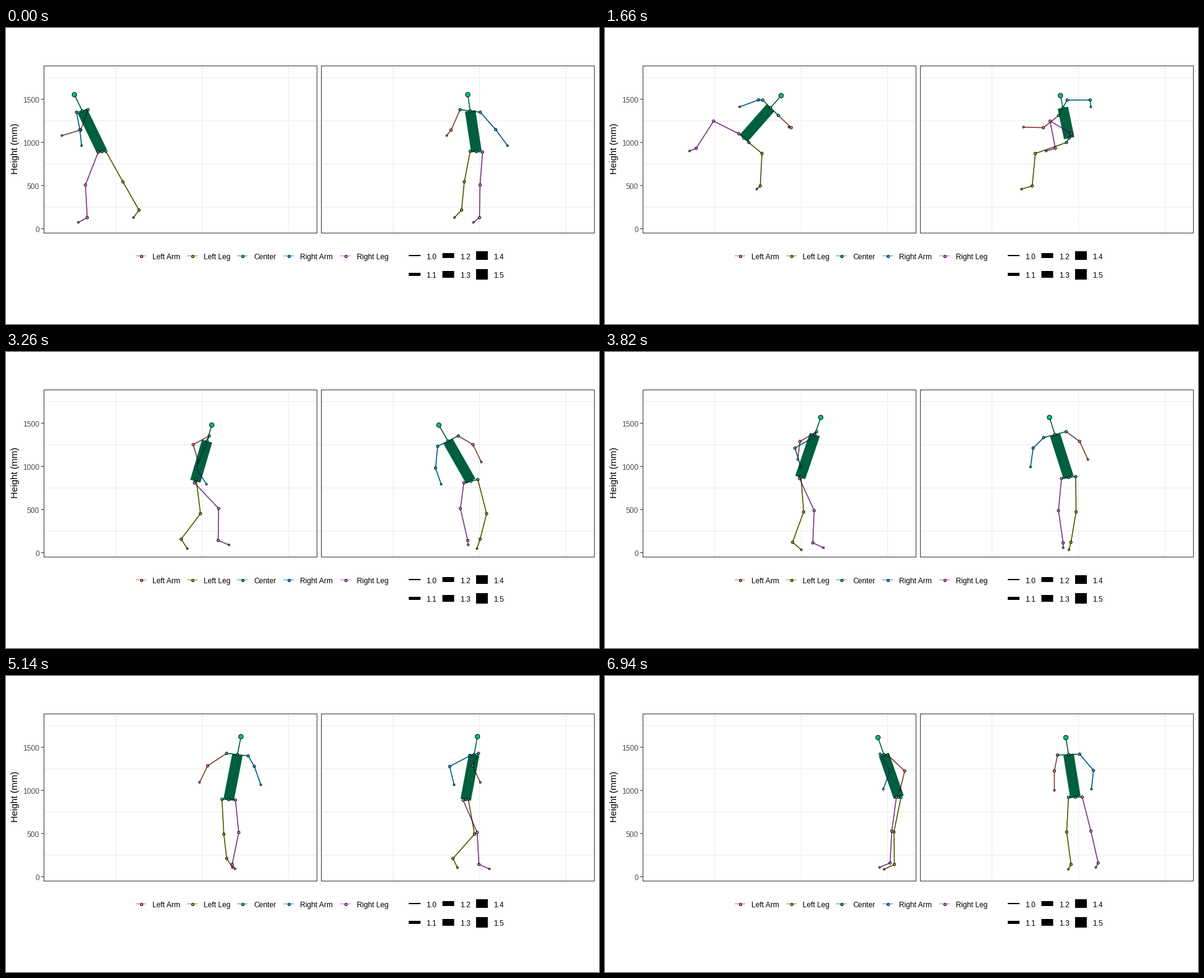
Animation of 960x480 px, one loop 6960 ms. Source, as a matplotlib script:

```python
import numpy as np
import matplotlib.pyplot as plt
from matplotlib.animation import FuncAnimation
from matplotlib.collections import LineCollection

W, H, DPI = 960, 480, 100
FRAMES, STEP = 348, 20
PX = 72 / DPI  # points per pixel

plt.rcParams["font.family"] = "Liberation Sans"
HUES = np.array([[248, 118, 109], [163, 165, 0], [0, 191, 125],
                 [0, 176, 246], [231, 107, 243]]) / 255
NAMES = ["Left Arm", "Left Leg", "Center", "Right Arm", "Right Leg"]

# Skeleton sizes in pixels
SHOULDER, HIP = 19, 11.7
UPPER_ARM, FOREARM = 38, 32.5
THIGH, SHANK, FOOT = 57.5, 53, 19
GROUND = 309

# Key moments: (side x, front x, screen y) of the driving points
KEYS = np.array([0, 920, 2360, 3260, 4380, 5900, 6940.0])
YAW = np.radians([-147, -114, -95, -3, -4, 167, 198])
PELVIS = np.array([(155, 761, 200), (170, 757, 202), (278, 747, 156), (306, 752, 209),
                   (327, 747, 197), (404, 742, 203), (475, 761, 196.0)])
NECK = [(123, 751, 134), (162, 726, 135), (229, 757, 197), (325, 715, 144),
        (350, 740, 124), (395, 756, 130), (451, 750, 127)]
L_HAND = [(90, 713, 174), (194, 656, 120), (212, 728, 129), (311, 769, 178),
          (318, 797, 169), (370, 699, 175), (477, 727, 185)]
R_HAND = [(122, 812, 191), (127, 802, 133), (305, 757, 184), (324, 704, 214),
          (311, 676, 158), (397, 779, 194), (450, 787, 183)]
L_ANKLE = [(215, 737, 295), (222, 736, 301), (219, 675, 117), (283, 767, 303),
           (326, 746, 304), (444, 737, 287), (468, 754, 305)]
R_ANKLE = [(131, 766, 307), (125, 762, 297), (327, 686, 157), (343, 747, 305),
           (338, 734, 306), (369, 733, 304), (461, 798, 303)]


def spline(t, v):
    """Cubic Hermite through the keys, flat at local extremes."""
    col = (-1,) + (1,) * (v.ndim - 1)
    slope = np.diff(v, axis=0) / np.diff(KEYS).reshape(col)
    m = np.gradient(v, KEYS, axis=0)
    m[1:-1][slope[1:] * slope[:-1] <= 0] = 0
    i = np.clip(np.searchsorted(KEYS, t, "right") - 1, 0, len(KEYS) - 2)
    h = (KEYS[i + 1] - KEYS[i]).reshape(col)
    s = (t - KEYS[i]).reshape(col) / h
    return ((1 + 2 * s) * (1 - s) ** 2 * v[i] + s * (1 - s) ** 2 * h * m[i]
            + s * s * (3 - 2 * s) * v[i + 1] + s * s * (s - 1) * h * m[i + 1])


def flip(t):
    """Roll angle of the aerial cartwheel: one eased full turn."""
    u = np.clip((t - 1300) / 1790, 0, 1)
    return 2 * np.pi * u * u * (3 - 2 * u)


def turn(v, a, p, q):
    """Rotate vectors by angle a in the plane of axes p and q."""
    out = v.copy()
    out[:, p] = np.cos(a) * v[:, p] - np.sin(a) * v[:, q]
    out[:, q] = np.sin(a) * v[:, p] + np.cos(a) * v[:, q]
    return out


def unit(v):
    return v / np.maximum(np.linalg.norm(v, axis=1, keepdims=True), 1e-9)


def across(v, d):
    """Part of v at right angles to the unit vector d."""
    return v - (v * d).sum(axis=1, keepdims=True) * d


def bend(root, goal, pole, a, b):
    """Two-bone limb from root towards goal, its joint pushed along pole."""
    d = unit(goal - root)
    r = np.linalg.norm(goal - root, axis=1, keepdims=True)
    r = np.clip(r, abs(a - b) + 1, a + b - 0.1)
    x = (a * a - b * b + r * r) / (2 * r)
    side = np.sqrt(np.maximum(a * a - x * x, 0))
    return root + d * x + unit(across(pole, d)) * side, root + d * r


def motion(t):
    """The 17 joints at all times t, shape (times, joints, 3)."""
    yaw, pelvis = spline(t, YAW), spline(t, PELVIS)

    def place(v, lag=0):
        return turn(turn(v, yaw, 0, 1), flip(t - lag), 0, 2)

    def axis(*v):
        return place(np.tile(np.array(v, float), (len(t), 1)))

    def path(points, lag=0):
        # blend in the body's own frame so that turns keep their shape
        local = turn(np.array(points) - PELVIS, -flip(KEYS - lag), 0, 2)
        out = pelvis + place(spline(t, turn(local, -YAW, 0, 1)), lag)
        out[:, 2] = np.minimum(out[:, 2], GROUND)
        return out

    ahead, left, up = axis(1, 0, 0), axis(0, 1, 0), axis(0, 0, -1)
    neck = path(NECK)
    trunk = neck - pelvis
    tilt = unit(across(left, unit(trunk)))
    hips = unit(left + tilt)
    arms, legs = [], []
    for sign, hand, ankle, lag in ((1, L_HAND, L_ANKLE, 200), (-1, R_HAND, R_ANKLE, 0)):
        out = sign * left
        top = neck + sign * SHOULDER * tilt
        arms += [top, *bend(top, path(hand), 0.5 * out - ahead, UPPER_ARM, FOREARM)]
        top = pelvis + sign * HIP * hips
        pole = ahead + 0.5 * out + 0.8 * up
        knee, heel = bend(top, path(ankle, lag), pole, THIGH, SHANK)
        shin = unit(heel - knee)
        toe = heel + FOOT * unit(unit(across(ahead, shin)) + 0.4 * shin)
        legs += [top, knee, heel, toe]
    joints = [pelvis, neck, neck + 0.4 * trunk] + arms + legs
    return np.stack(joints, axis=1) + 0.5


JOINTS = motion(np.arange(FRAMES) * float(STEP))

# Joint chains in drawing order, with their colour group
CHAINS = [((3, 4, 5), 0), ((9, 10, 11, 12), 1), ((0, 1, 2), 2), ((3, 1, 6), 2),
          ((9, 0, 13), 2), ((6, 7, 8), 3), ((13, 14, 15, 16), 4)]
BONES = [(a, b, g) for c, g in CHAINS for a, b in zip(c, c[1:])]
A, B, G = (np.array(c) for c in zip(*BONES))
GROUP = np.zeros(17, int)
for chain, g in CHAINS:
    GROUP[list(chain)] = g
GROUP[1] = 2

fig = plt.figure(figsize=(W / DPI, H / DPI), dpi=DPI, facecolor="white")
ax = fig.add_axes([0, 0, 1, 1])
ax.set_xlim(0, W)
ax.set_ylim(H, 0)
ax.axis("off")


def lines(segs, color, px=1.0, z=1, cap="butt", **kw):
    lc = LineCollection(segs, colors=color, linewidths=np.multiply(px, PX),
                        capstyle=cap, zorder=z, snap=False, **kw)
    return ax.add_collection(lc, autolim=False)


def dots(x, y, px, color, z):
    return ax.scatter(x, y, s=np.multiply(px, PX) ** 2, c=color,
                      edgecolors="black", linewidths=0.9 * PX, zorder=z)


def label(x, y, s, px=12, color="black", **kw):
    ax.text(x, y, s, fontsize=px * PX, color=color, **kw)


# Panels, grid and axis
for x in (61.5, 510.5):
    r, top, low = x + 442, 61.5, 332.5
    lines([[(x, y), (r, y)] for y in np.arange(80.5, low, 70)]
          + [[(x + d, top), (x + d, low)] for d in (116, 256, 396)], "#EBEBEB")
    lines([[(x, top), (r, top)], [(r, top), (r, low)], [(r, low), (x, low)],
           [(x, low), (x, top)]], "#333333", z=6, cap="projecting")
for k in range(4):
    y = 325.5 - 70 * k
    lines([[(57, y), (61, y)]], "#333333")
    label(54, y + 5.5, str(500 * k), color="#4D4D4D", ha="right")
label(15.5, 196, "Height (mm)", 15, rotation=90, ha="center", va="center")

# Colour legend
for x, hue, name in zip((218.5, 301.5, 382.5, 457.5, 549.5), HUES, NAMES):
    lines([[(x - 8.5, 369.5), (x + 8.5, 369.5)]], [hue * 0.75], 0.8)
    dots([x], [369.5], 4.2, [hue], 3)
    label(x + 18.5, 375, name)

# Width legend
for k in range(6):
    x, y = 652 + 54.5 * (k // 2), 369 + 30.5 * (k % 2)
    lines([[(x, y), (x + 19, y)]], "black", 2 + 3 * k)
    label(x + 28.5, 375 + 30 * (k % 2), f"{1 + k / 10:.1f}")

# Moving figure, once per panel
widths = np.tile(np.where((A == 0) & (B == 1), 17, 1.5), 2)
diam = np.full(17, 4.2)
diam[[5, 8, 12, 16]] = 3
diam[2] = 7.4
fill = np.column_stack([HUES[GROUP], np.full(17, 0.7)])
fill[2, 3] = 1
blank = np.zeros((len(widths), 2, 2))
limbs = lines(blank, np.tile(HUES[G], (2, 1)), widths, 3)
shade = lines(blank, "black", widths, 4, alpha=0.5)
knobs = dots(np.zeros(34), np.zeros(34), np.tile(diam, 2), np.tile(fill, (2, 1)), 5)


def update(i):
    views = [JOINTS[i][:, [c, 2]] for c in (0, 1)]
    segs = np.concatenate([np.stack([v[A], v[B]], axis=1) for v in views])
    limbs.set_segments(segs)
    shade.set_segments(segs)
    knobs.set_offsets(np.concatenate(views))
    return limbs, shade, knobs


anim = FuncAnimation(fig, update, frames=FRAMES, interval=STEP, repeat=True,
                     repeat_delay=0, blit=False)
plt.show()
```
